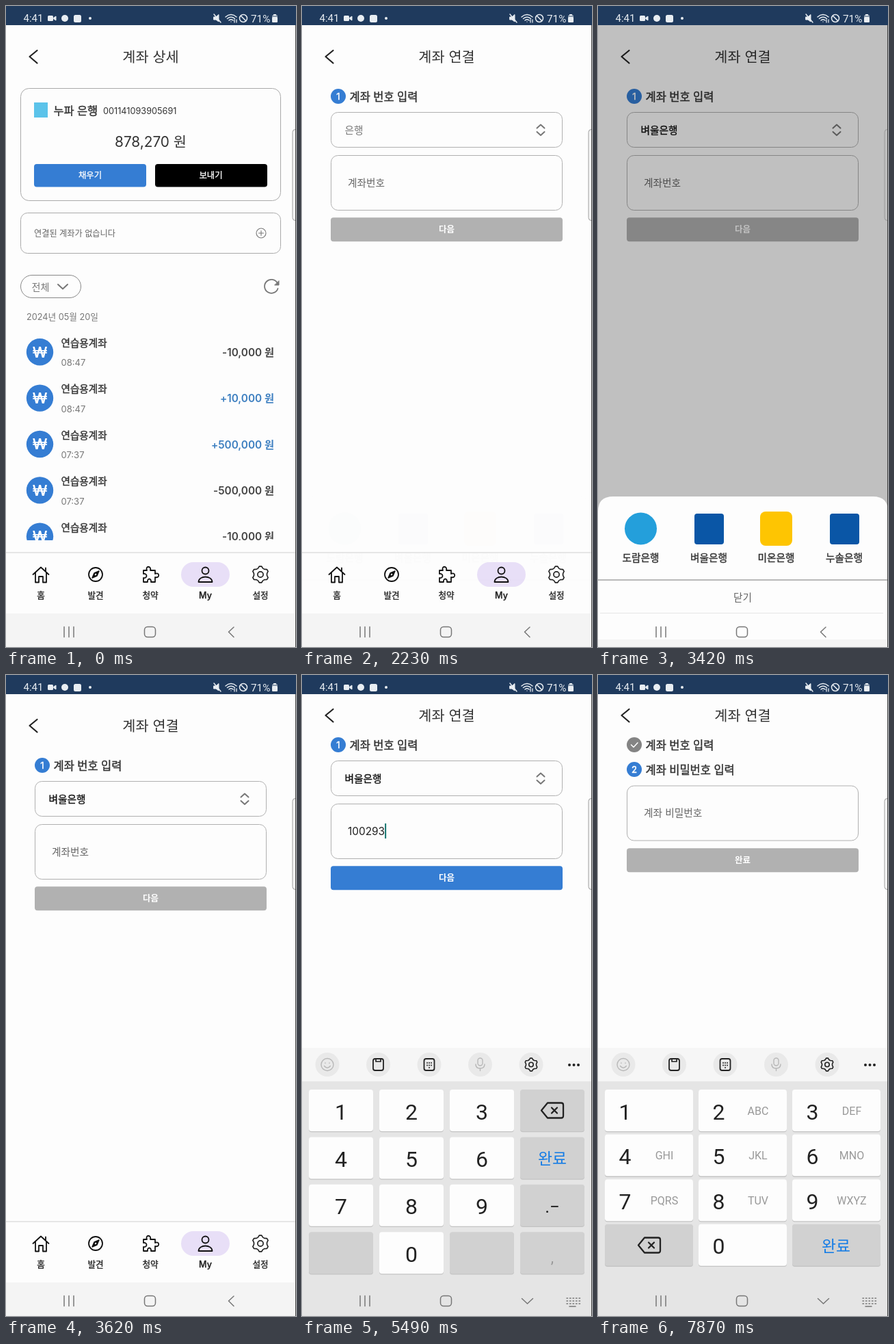
An HTML page that plays this animation: 424x937 px, repeating every 8 s.

```html
<!DOCTYPE html>
<html lang="ko">
<head>
<meta charset="utf-8">
<style>
html, body { margin: 0; width: 100%; height: 100%; overflow: hidden; background: #fdfdfd }
svg { display: block; width: 100vw; height: 100vh; font-family: Inter, "Noto Sans CJK KR", "Noto Sans CJK", sans-serif }
text { white-space: pre }
.pad, .status { font-family: Roboto, "Noto Sans CJK KR", "Noto Sans CJK", sans-serif }
</style>
</head>
<body>
<svg id="stage" viewBox="0 0 424 937"></svg>
<script>
const BLUE = '#357dd3', GREY = '#b1b1b1', INK = '#333';
const BANKS = ['도람은행', '벼울은행', '미온은행', '누솔은행'];

// Text is centred vertically on y. A thin stroke stands in for the missing medium weight.
function text(x, y, s, size, fill = INK, weight = 400, anchor = 'start', extra = '') {
  const base = y + size * (/[가-힣]/.test(s) ? .38 : .36);
  const medium = weight == 500 ? `stroke="${fill}" stroke-width="${size * .025}"` : '';
  return `<text x="${x}" y="${base}" font-size="${size}" fill="${fill}" font-weight="${weight}" text-anchor="${anchor}" ${medium} ${extra}>${s}</text>`;
}
const mid = (x, y, s, size, fill, weight) => text(x, y, s, size, fill, weight, 'middle');
const rect = (x, y, w, h, r, fill, stroke = 'none', extra = '') =>
  `<rect x="${x}" y="${y}" width="${w}" height="${h}" rx="${r}" fill="${fill}" stroke="${stroke}" ${extra}/>`;
const circle = (x, y, r, fill, stroke = 'none', w = 1) =>
  `<circle cx="${x}" cy="${y}" r="${r}" fill="${fill}" stroke="${stroke}" stroke-width="${w}"/>`;
const line = (d, stroke = INK, w = 2, fill = 'none') =>
  `<path d="${d}" fill="${fill}" stroke="${stroke}" stroke-width="${w}" stroke-linecap="round" stroke-linejoin="round"/>`;
const group = (id, body, attr = '') => `<g id="${id}" ${attr}>${body}</g>`;
const at = (x, y, body) => `<g transform="translate(${x} ${y})">${body}</g>`;

const header = title => line('M45.500 65 L34.500 74 L45.500 83.500', '#222', 2.2) + mid(211.5, 74.5, title, 20.8);
const outline = (y, h) => rect(42.5, y + .5, 338, h, 10, '#fdfdfd', '#b0b0b0');
const step = (y, mark, label, fill = BLUE) =>
  circle(53, y, 11, fill) + mark + text(69.5, y + .4, label, 16.5, INK, 500);
const button = (id, y, label) => rect(42, y, 339, 35, 4, GREY, 'none', `id="${id}"`) + mid(211.5, y + 17, label, 12.5, '#fff', 700);

function gear(x, y, r, w) {
  let d = '';
  for (let i = 0; i < 24; i++) {
    const a = (i + 1.5) * Math.PI / 12, k = i % 4 < 2 ? r : r * .8;
    d += (i ? 'L' : 'M') + (x + k * Math.cos(a)).toFixed(2) + ' ' + (y + k * Math.sin(a)).toFixed(2);
  }
  return line(d + 'Z', '#222', w) + circle(x, y, r * .34, 'none', '#222', w);
}

function statusBar() {
  const c = '#e8edf2';
  return rect(0, 0, 424, 28, 0, '#1f3a5d') + text(25.5, 18, '4:41', 15, c) +
    rect(61, 14, 8, 8, 1.5, c) + line('M70 17 L73 15 V21 L70 19Z', c, 1, c) +
    circle(86, 18, 5, c) + rect(99, 13, 11, 11, 2.5, c) + circle(123, 18, 2, c) +
    line('M304 16 H307 L311 12.500 V23 L307 20 H304Z', c, 1, c) + line('M304 12 L314 24', c, 1.5) +
    line('M321 16 Q329 9 337 16 M323.500 18.500 Q329 14 334.500 18.500 M326 21 Q329 18.500 332 21', c, 1.5) +
    line('M329 23 V23.100 M334 20 V24 M337 20 V24', c, 1.3) +
    circle(347, 18, 5.5, 'none', c, 1.5) + line('M343.500 14.500 L350.500 21.500', c, 1.5) +
    text(358, 18, '71%', 15.3, c) + rect(389, 13, 8, 11, 1.5, '#8797aa') + rect(389, 16, 8, 8, 1.5, c) + rect(391, 12, 4, 2, 0, c);
}

const navIcons = (last = 'M333 908 L325.500 915 L333 922.500') =>
  line('M85 907.500 V922.500 M92 907.500 V922.500 M99 907.500 V922.500', '#777', 1.5) +
  rect(202.5, 907.5, 16, 15, 4.5, 'none', '#777', 'stroke-width="1.5"') + line(last, '#777', 1.5);

function tabBar() {
  const xs = [51, 131, 211, 291.5, 372];
  const icons = rect(256, 813, 71, 36, 18, '#e8dff7') +
    line('M39.500 831 L51 820.500 L62.500 831 M43 828.500 V842.500 H48 V834 H54 V842.500 H59 V828.500 M58 826 V821.500', '#111', 1.8) +
    circle(131, 831, 10, 'none', '#111', 1.8) + line('M136 826 L133 833 L126 836 L129 829Z', '#111', 1.5, '#111') + circle(131, 831, 1.2, '#fff') +
    line('M201 825 H206 C203 818 213 818 211 825 H218 V830 C225 827 225 837 218 835 V842 H212 C213 836 206 836 207 842 H201 V836 C207 837 207 829 201 830Z', '#111', 1.8) +
    circle(291.5, 825.5, 5, 'none', '#111', 1.8) + line('M281.500 842 C281.500 832 301.500 832 301.500 842Z', '#111', 1.8) +
    gear(372, 831, 12, 1.7);
  return rect(0, 799, 424, 89, 0, '#fdfdfd') + rect(0, 798.5, 424, 1, 0, '#cfcfcf') + icons +
    ['홈', '발견', '청약', 'My', '설정'].map((s, i) => mid(xs[i], 861.5, s, 12.6, '#222', 500)).join('') +
    rect(0, 888, 424, 49, 0, '#f4f4f4') + navIcons();
}

function detailPage() {
  const rows = [['08:47', '-10,000'], ['08:47', '+10,000'], ['07:37', '+500,000'], ['07:37', '-500,000'], ['07:37', '-10,000']];
  const list = rows.map(([time, sum], i) => at(0, i * 67.4,
    circle(49.5, 505.7, 19.7, BLUE) + mid(49.5, 505.7, '₩', 22, '#fff', 600) +
    text(80.5, 492.5, '연습용계좌', 14.6, INK, 500) + text(80.5, 521.7, time, 13, '#777') +
    text(392, 506, sum + ' 원', 15.3, sum[0] == '+' ? '#3d7fc0' : '#444', 600, 'end'))).join('');
  return rect(0, 28, 424, 771, 0, '#fdfdfd') + header('계좌 상세') +
    rect(21.5, 120.5, 380, 164, 12, 'none', '#aaa') + rect(41, 141, 20, 22, 0, '#5bc3ea') +
    text(69.5, 153, '누파 은행', 16.4, INK, 500) + text(142, 153.5, '001141093905691', 12.7) +
    mid(211.5, 198.5, '878,270 원', 20.8) +
    rect(41, 231, 164, 33.5, 4, BLUE) + mid(123, 247, '채우기', 12.4, '#fff', 500) +
    rect(218, 231, 164, 33.5, 4, '#000') + mid(299.5, 247, '보내기', 12.4, '#fff', 500) +
    rect(21.5, 302.5, 380, 59, 10, 'none', '#aaa') + text(41, 332, '연결된 계좌가 없습니다', 12.2, '#666') +
    circle(373, 332, 7, 'none', '#777', 1.1) + line('M369.500 332 H376.500 M373 328.500 V335.500', '#777', 1.1) +
    rect(21.5, 393.5, 88, 33, 16.5, 'none', '#888') + text(37.5, 410.5, '전체', 14.1, '#777') +
    line('M76 407 L83 413.500 L90 407', '#777', 2) +
    line('M396.500 404.500 A10 10 0 1 0 397.500 413', '#777', 1.8) + line('M399 402 V408 H393Z', '#777', 1, '#777') +
    text(30, 454.5, '2024년 05월 20일', 12.7, '#777') +
    `<g clip-path="url(#listClip)">${list}</g>`;
}

const linkPage = () => rect(0, 28, 424, 771, 0, '#fdfdfd') + group('title', header('계좌 연결')) +
  group('form',
    group('first', step(132, mid(53, 132, '1', 13, '#fff', 500), '계좌 번호 입력') +
      outline(155, 51) + text(62.5, 181, '은행', 14.7, '#777', 400, 'start', 'id="bank"') +
      line('M343.500 178.500 L349 173.500 L354.500 178.500 M343.500 184 L349 189 L354.500 184', '#777', 2) +
      outline(218, 80) + text(67, 258, '계좌번호', 14.7, '#666', 400, 'start', 'id="number"') +
      rect(0, 247, 2, 22, 0, '#11756f', 'none', 'id="caret"') + button('next', 309.3, '다음')) +
    group('second', step(132, line('M48.500 132 L52 135.500 L58 129', '#fff', 1.5), '계좌 번호 입력', '#848484') +
      step(168, mid(53, 168, '2', 13, '#fff', 500), '계좌 비밀번호 입력') +
      outline(191.5, 80) + text(67, 231, '계좌 비밀번호', 14.7, '#666') + button('done', 283.3, '완료')));

function bankSheet() {
  const xs = [62.5, 162, 260.5, 360];
  return rect(0, 28, 424, 909, 0, '#000', 'none', 'opacity=".245"') +
    `<path d="M0 937 V739 Q0 717 22 717 H402 Q424 717 424 739 V937Z" fill="#fdfdfd"/>` +
    circle(62.5, 764, 23.5, '#249fdb') + rect(141, 742, 43, 45, 4, '#0a56a6') +
    rect(237, 739, 47, 50, 8, '#fec502') + rect(339, 742, 43, 45, 4, '#0a56a6') +
    BANKS.map((s, i) => mid(xs[i], 806, s, 14.7, INK, 500)).join('') +
    rect(0, 838.5, 424, 1, 0, '#777') + mid(211.5, 864, '닫기', 14.7, '#666') +
    rect(3, 887, 414, 1, 0, '#e6e6e6') + rect(0, 926, 424, 11, 0, '#f4f4f4') + navIcons();
}

const key = (x, y, w, fill = '#fdfdfd', id = '') =>
  rect(x, y + 1.3, w, 61, 4, '#c3c3c3') + rect(x, y, w, 61, 4, fill, 'none', id && `id="${id}"`);
const erase = (x, y) => line(`M${x - 16} ${y} L${x - 7} ${y - 11} H${x + 13} Q${x + 16} ${y - 11} ${x + 16} ${y - 8} V${y + 8} Q${x + 16} ${y + 11} ${x + 13} ${y + 11} H${x - 7}Z`, '#222', 2.3) +
  line(`M${x - 1} ${y - 4} l8 8 m0 -8 l-8 8`, '#222', 2.3);

function numberPad() {
  const cols = [10, 113, 216, 319], dark = '#d1d1d1';
  let s = '';
  for (let r = 0; r < 4; r++) for (let c = 0; c < 4; c++) {
    const x = cols[c], y = 606 + r * 69.4;
    const digit = r < 3 && c < 3 ? r * 3 + c + 1 : r == 3 && c == 1 ? 0 : '';
    s += key(x, y, 94, digit === '' ? dark : '#fdfdfd', digit === '' ? '' : 'key' + digit) + mid(x + 47, y + 32, digit, 32, '#222');
  }
  return s + erase(366, 636.5) + mid(366, 706.5, '완료', 22.8, '#127be6') +
    mid(366, 777, '.−', 26, '#222') + mid(366, 851, ',', 22, '#999');
}

function letterPad() {
  const sub = ['', 'ABC', 'DEF', 'GHI', 'JKL', 'MNO', 'PQRS', 'TUV', 'WXYZ'];
  let s = '';
  for (let i = 0; i < 12; i++) {
    const x = 10 + i % 3 * 137, y = 606 + Math.floor(i / 3) * 65.6;
    s += key(x, y, 129, i == 9 || i == 11 ? '#d1d1d1' : '#fdfdfd');
    if (i < 9 || i == 10) s += mid(x + 29.5, y + 32, i < 9 ? i + 1 : 0, 32, '#222') + mid(x + 87, y + 31, sub[i] || '', 16, '#999');
  }
  return s + erase(75, 833.5) + mid(348, 834, '완료', 22.8, '#127be6');
}

function keyboard() {
  const g = '#b8b8b8', k = '#222';
  let dots = '';
  for (let i = 0; i < 15; i++) dots += `M${387 + i % 5 * 4.5} ${911 + Math.floor(i / 5) * 4}h1.500 `;
  return rect(0, 545, 424, 392, 0, '#e5e5e5') + rect(0, 545, 424, 49, 0, '#f6f6f6') +
    [37, 111.5, 186, 260.5, 335].map(x => circle(x, 569.5, 17.5, '#e9e9e9')).join('') +
    circle(37, 569.5, 9, 'none', g, 1.4) + line('M34 567 v.5 M40 567 v.5 M32.500 571.500 Q37 577 41.500 571.500', g, 1.4) +
    rect(104, 561, 15, 17, 3, 'none', k, 'stroke-width="1.8"') + line('M108 561 V565 H115 V561', k, 1.7) +
    rect(178.5, 561, 15, 17, 3, 'none', k, 'stroke-width="1.8"') + line('M183 567 h.1 M186 567 h.1 M189 567 h.1 M183 570.500 h.1 M186 570.500 h.1 M189 570.500 h.1 M186 574 h.1', k, 1.8) +
    rect(257, 560, 7, 11, 3.5, 'none', g, 'stroke-width="1.4"') + line('M254 569 Q254 575 260.500 575 Q267 575 267 569 M260.500 575 V578.500', g, 1.4) +
    gear(335, 569.5, 9.5, 1.6) + [391, 397.5, 404].map(x => circle(x, 570, 2, k)).join('') +
    group('pad1', numberPad()) + group('pad2', letterPad()) +
    navIcons('M321.500 911.500 L329.500 919 L337.500 911.500') + line(dots + 'M391 923h9', '#777', 1.5);
}

const stage = document.getElementById('stage');
stage.innerHTML = '<clipPath id="listClip"><rect y="470" width="424" height="311"/></clipPath>' +
  group('detail', detailPage()) + group('link', linkPage()) + tabBar() +
  group('sheet', bankSheet()) + group('board', keyboard(), 'class="pad"') + group('status', statusBar(), 'class="status"') +
  rect(419, 180.5, 10, 133, 4, 'none', '#999') + rect(423, 28, 1, 909, 0, '#444');

const $ = id => document.getElementById(id);
const ramp = (t, a, b) => Math.min(1, Math.max(0, (t - a) / (b - a)));
const show = (id, on) => $(id).setAttribute('opacity', +on);
const shift = (id, y) => $(id).setAttribute('transform', `translate(0 ${y})`);

const typed = '1002931645769';
const presses = [4480, 4590, 4690, 4880, 5070, 5230, 5500, 5650, 5820, 5980, 6130, 6260, 6480];
const LAG = 60, HOLD = 90;

function draw(now) {
  const t = now % 8000;
  show('link', ramp(t, 1120, 1320));
  show('sheet', t < 3100 ? ramp(t, 2230, 2500) : 1 - ramp(t, 3430, 3610));

  const chosen = t >= 3300, bank = $('bank');
  bank.textContent = chosen ? BANKS[1] : '은행';
  bank.setAttribute('fill', chosen ? '#111' : '#777');
  bank.setAttribute('stroke', chosen ? '#111' : 'none');
  bank.setAttribute('stroke-width', .3);

  const up = 1 - (1 - ramp(t, 4000, 4280)) ** 3;
  shift('board', 392 * (1 - up));
  show('board', up > 0);
  shift('title', -15 * up);
  shift('form', -30 * up);

  const value = typed.slice(0, presses.filter(p => t >= p + LAG).length), number = $('number');
  number.textContent = value || '계좌번호';
  number.setAttribute('fill', value ? '#222' : '#666');
  number.setAttribute('font-size', value ? 15.4 : 14.7);
  $('caret').setAttribute('x', 67 + (value ? number.getComputedTextLength() : 0));
  show('caret', value !== '');
  $('next').setAttribute('fill', value ? BLUE : GREY);

  const active = presses.findIndex(p => t >= p && t < p + HOLD);
  for (let d = 0; d < 10; d++) $('key' + d).setAttribute('fill', typed[active] === String(d) ? '#a5a5a5' : '#fdfdfd');

  const secure = t >= 7280, letters = t >= 7380;
  show('first', !secure);
  show('second', secure);
  show('pad1', !letters);
  show('pad2', letters);
}

const start = performance.now();
function tick() {
  draw(performance.now() - start);
  requestAnimationFrame(tick);
}
tick();
</script>
</body>
</html>
```
